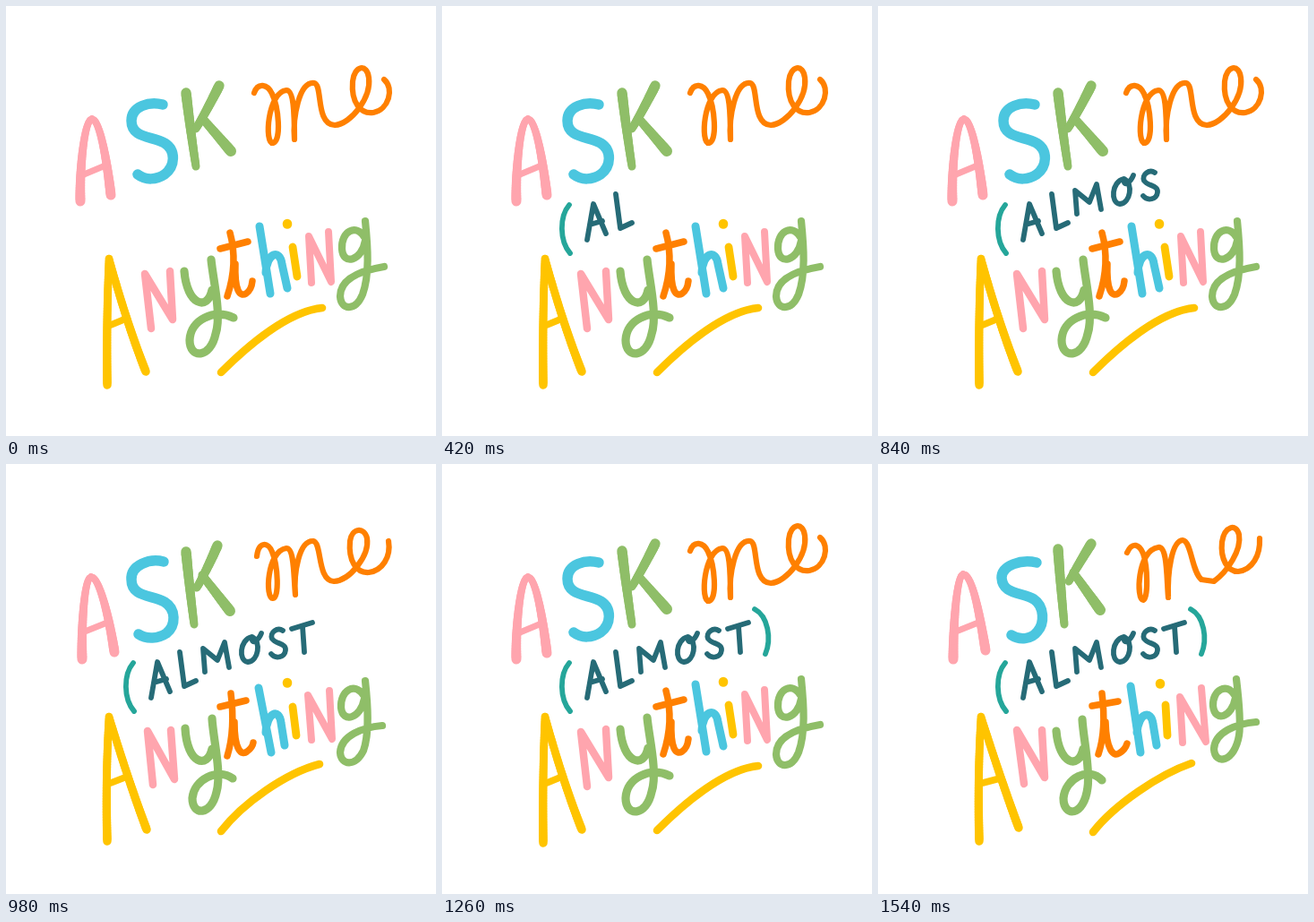
Recreate the animation shown at these times as an HTML page. Size 480 by 480 pixels, loop 1.68 s.

```html
<!DOCTYPE html>
<html lang="en">
<head>
<meta charset="utf-8">
<title>Ask me (almost) anything</title>
<style>
  html, body { margin: 0; width: 100%; height: 100%; overflow: hidden; background: #fff; }
  svg { display: block; width: 100%; height: 100%; }
  path { fill: none; stroke-linecap: round; stroke-linejoin: round; }
</style>
</head>
<body>
<svg id="stage" viewBox="0 0 480 480"></svg>
<script>
const STEP = 140, STEPS = 12;
const PINK = '#ffa5ae', BLUE = '#4bc6df', GREEN = '#8fbe68', ORANGE = '#ff8000',
      YELLOW = '#ffc400', TEAL = '#25a69a', DARK = '#266b77';

const stage = document.getElementById('stage');

function add(parent, name, attributes = {}) {
  const node = document.createElementNS('http://www.w3.org/2000/svg', name);
  for (const key in attributes) node.setAttribute(key, attributes[key]);
  return parent.appendChild(node);
}

const stroke = (parent, color, width, d) =>
  add(parent, 'path', { stroke: color, 'stroke-width': width, d });

// Brush stroke whose width runs evenly from one end to the other.
function taper(parent, color, from, to, d) {
  const guide = stroke(parent, 'none', 0, d);
  const length = guide.getTotalLength(), count = Math.ceil(length / 3);
  let last = guide.getPointAtLength(0);
  for (let i = 1; i <= count; i++) {
    const point = guide.getPointAtLength(length * i / count);
    stroke(parent, color, from + (to - from) * i / count,
      `M${last.x} ${last.y}L${point.x} ${point.y}`);
    last = point;
  }
  guide.remove();
}

// Three hand-drawn variants of every letter, shown in turn.
const poses = [0, 1, 2].map(() => add(stage, 'g'));
const letter = (color, width, ...variants) =>
  variants.forEach((d, i) => stroke(poses[i], color, width, d));
const brush = (color, from, to, ...variants) =>
  variants.forEach((d, i) => d.split(/(?=M)/).forEach(part => taper(poses[i], color, from, to, part)));

// ASK
brush(PINK, 7.5, 11,
  'M96 126C87 127 82 185 83 218M96 126C105 127 113 175 117 211',
  'M95 126C87 127 84 185 85 218M95 126C104 126 115 170 121 210',
  'M95 123C88 124 84 178 84 218M95 123C105 123 113 165 120 208');
letter(PINK, 7, 'M87 188L111 178', 'M88 187L113 177', 'M87 187L112 177');
letter(BLUE, 11.5,
  'M175 110C160 106 140 112 140 128C140 148 163 145 177 153C190 161 189 179 177 188C168 194 156 195 147 188',
  'M176 109C160 105 139 113 140 129C140 149 163 146 177 154C190 162 190 180 179 189C170 195 157 196 148 190',
  'M177 110C160 106 138 113 138 127C139 146 161 143 174 151C186 159 186 178 178 187C171 196 158 197 149 191');
brush(GREEN, 11.5, 9,
  'M201 97Q206 140 212 179M238 89Q224 117 212 137',
  'M201 98Q205 140 210 179M236 91Q224 119 213 138',
  'M201 95Q204 140 208 179M238 89Q225 110 213 131');
brush(GREEN, 9, 12,
  'M219 125L251 162',
  'M219 124L250 164',
  'M218 121L248 163');

// me
letter(ORANGE, 6.2,
  'M277 97C281 85 292 87 297 98C304 112 308 150 298 153C288 154 292 96 313 94C322 94 322 125 322 149C320 125 327 84 344 86C354 88 345 132 367 133C385 132 408 102 405 80C403 64 389 66 387 84C385 108 396 121 410 119C427 116 434 92 422 82',
  'M280 103C282 86 293 87 297 98C304 114 305 150 298 150C289 151 291 97 313 94C322 94 321 125 323 146C321 122 327 85 343 86C353 88 347 130 366 131C384 130 406 102 403 83C400 70 386 71 384 86C382 108 391 122 405 121C420 119 430 104 427 86',
  'M278 99C284 86 292 90 296 100C301 114 302 150 296 152C288 152 289 96 313 93C323 92 322 125 324 149C323 120 328 86 340 85C350 86 350 120 361 129L375 131C390 120 406 96 403 79C400 66 387 69 384 87C382 106 390 120 402 120C418 118 427 102 426 83');

// ANYTHING
brush(YELLOW, 8.5, 9.5,
  'M115 282Q112 350 113 423M115 282Q135 355 156 408',
  'M115 282Q111 350 113 421M115 282Q137 355 157 408',
  'M115 282Q111 350 113 421M115 282Q138 355 157 406');
letter(YELLOW, 7.5, 'M117 356L134 349', 'M117 356L135 349', 'M117 356L136 351');
letter(PINK, 8.5,
  'M162 360L155 299L186 350L183 296',
  'M164 358L158 298L188 352L184 297',
  'M163 357L155 297L186 350L183 297');
letter(GREEN, 9.2,
  'M199 296C202 334 225 341 230 317M229 283C231 305 241 345 234 366C228 394 205 394 205 373C206 350 232 338 254 348',
  'M200 295C202 335 225 341 230 318M230 284C231 305 241 345 235 366C229 393 208 393 208 373C210 352 236 339 253 351',
  'M199 298C202 335 224 342 229 318M228 285C229 305 237 340 234 361C230 394 207 395 207 373C209 351 235 337 250 353');
letter(ORANGE, 7.5,
  'M250 253C256 275 255 300 247 324M256 288C255 318 261 325 268 321Q274 317 275 307M239 271L270 263',
  'M251 256C254 280 254 303 247 326M255 288C255 320 263 326 269 321Q275 317 276 311M239 271L268 264',
  'M250 256C253 280 253 303 246 324M254 288C255 320 263 327 269 323Q276 319 278 312M239 270L268 265');
letter(BLUE, 9,
  'M283 246L295 321M290 298C291 275 306 271 308 288L314 315',
  'M282 250L296 322M290 300C291 277 305 272 307 289L311 314',
  'M282 248L293 322M289 300C291 277 305 274 307 290L311 314');
letter(YELLOW, 8.8, 'M320 269L325 302', 'M320 271L324 303', 'M321 269L323 303');
letter(YELLOW, 10.5, 'M314 243v.5', 'M314 244v.5', 'M315 245v.5');
letter(PINK, 8,
  'M341 309L338 257L363 308L360 252',
  'M341 308L337 258L364 307L361 253',
  'M340 311L337 260L366 310L361 250');
letter(GREEN, 8.2,
  'M400 258C391 243 374 251 375 271C376 290 397 285 401 262M401 240C404 270 406 300 398 322C390 341 374 340 373 324C373 303 398 295 422 291',
  'M399 258C389 243 373 253 374 272C376 290 396 284 400 262M401 242C404 270 406 300 399 320C390 338 374 337 373 322C374 303 398 294 420 292',
  'M398 258C389 243 373 253 374 270C376 289 395 283 399 261M400 240C403 265 405 290 403 303C398 333 376 337 375 318C376 299 400 290 422 288');
letter(YELLOW, 8.6,
  'M240 409C268 381 314 341 353 337',
  'M240 410C264 379 312 345 350 335',
  'M240 411C264 380 315 346 350 334');

// (ALMOST) appears one character per step and stays still.
const almost = [
  [TEAL, 'M142 222C131 235 131 262 143 276'],
  [DARK, 'M162 261L169 221L183 254M165 244L179 240'],
  [DARK, 'M194 210L199 248L212 242'],
  [DARK, 'M222 232L220 206L236 219L244 199L249 227'],
  [DARK, 'M274 193C261 196 259 220 270 221C282 220 285 198 275 193C273 203 282 197 285 189'],
  [DARK, 'M309 186C303 182 294 188 297 195C301 201 313 200 312 208C311 216 301 218 296 212'],
  [DARK, 'M319 184L342 177M331 181L333 210'],
  [TEAL, 'M349 162C364 170 368 195 361 212']
].map(([color, d]) => stroke(stage, color, 5.8, d));

const show = (node, visible) => node.setAttribute('visibility', visible ? 'visible' : 'hidden');

function draw() {
  const step = Math.floor(performance.now() / STEP) % STEPS;
  poses.forEach((pose, i) => show(pose, i === step % 3));
  almost.forEach((character, i) => show(character, i < step));
  requestAnimationFrame(draw);
}
draw();
</script>
</body>
</html>
```
